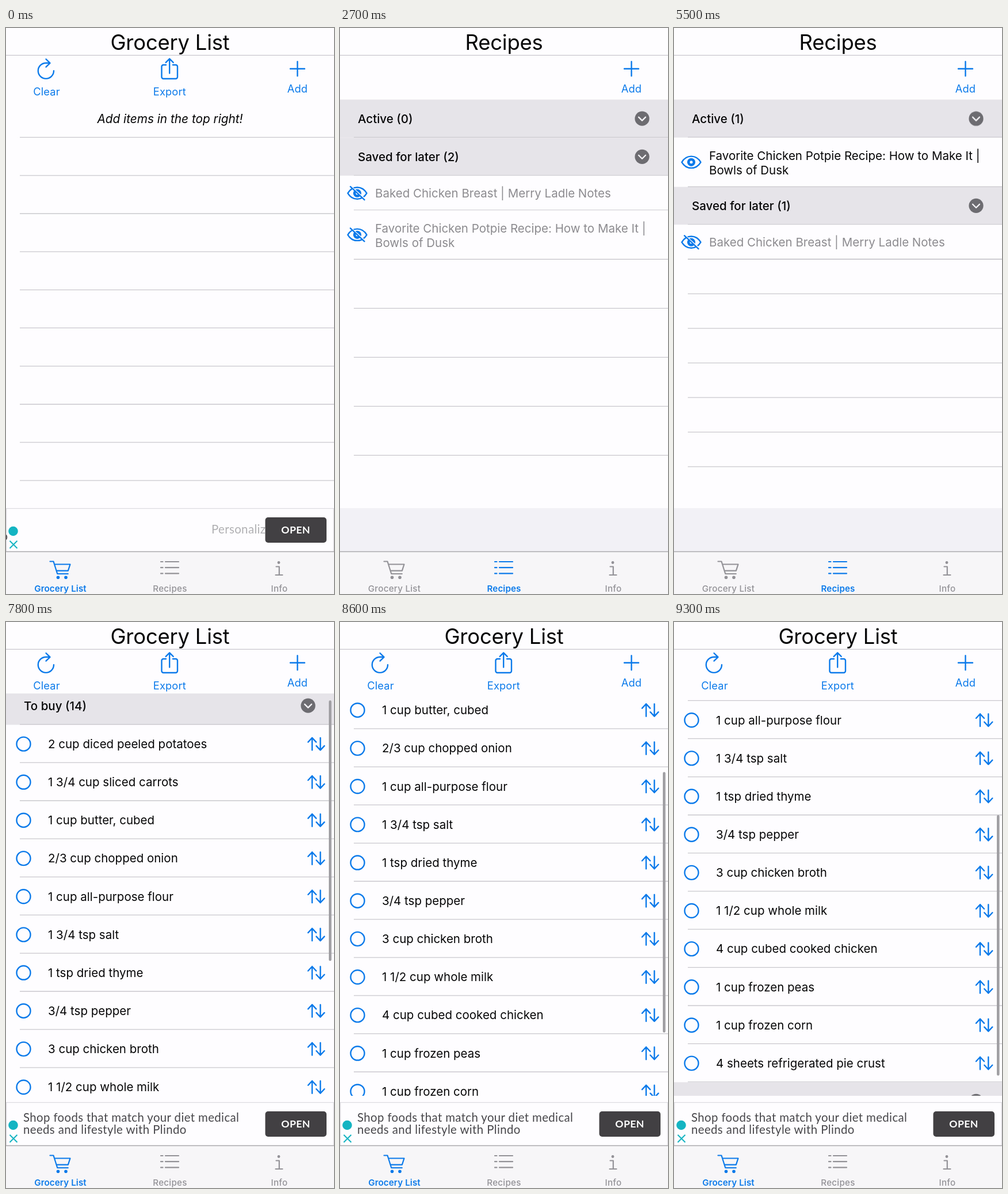
An HTML page for the animation above (9400 ms loop, 570 px wide and 982 px high).

```html
<!DOCTYPE html>
<html lang="en">
<head>
<meta charset="utf-8">
<title>Grocery list</title>
<style>
@property --s { syntax: '<number>'; inherits: true; initial-value: 0 }
@property --p { syntax: '<number>'; inherits: true; initial-value: 0 }

html, body { margin: 0; width: 100%; height: 100%; overflow: hidden; background: #fefdff }
svg { display: block; width: 100vw; height: 100vh }
text { font: 20.5px Inter, 'Liberation Sans', sans-serif; fill: #060607 }
.title { font-size: 36.4px; letter-spacing: -.2px; text-anchor: middle }
.label { font-size: 18.3px; letter-spacing: .1px; text-anchor: middle; fill: #0b7aea }
.hint { font-style: italic; font-size: 20.8px; text-anchor: middle }
.head { font-weight: 500 }
.later { fill: #8c8b8f }
.tab text { font-size: 15.2px; font-weight: 500; letter-spacing: .25px; text-anchor: middle; fill: #939297; stroke: none }
.tab.on text { fill: #0b7aea; font-weight: 600; letter-spacing: .1px }
.tab { stroke: #939297; color: #939297 }
.tab.on { stroke: #0b7aea; color: #0b7aea }
.ad text { font: 20.4px Lato, sans-serif; letter-spacing: .38px; fill: #47464a }
.ad .cta { font-size: 17.6px; font-weight: 700; letter-spacing: .4px; text-anchor: middle; fill: #fff }
.icon { fill: none; stroke: #0b7aea; stroke-width: 2.4; stroke-linecap: round; stroke-linejoin: round }
.line { stroke: #c9c8cd; stroke-width: 1.3 }

/* Visibility of the screens */
.home, .recipes, .empty, .full, .bar, .before, .after, .first, .second {
  animation: 9400ms step-end infinite;
}
.home { animation-name: home }
.recipes { animation-name: recipes }
.empty, .first { animation-name: early }
.full, .second { animation-name: late }
.bar { animation-name: bar }
.before { animation-name: before }
.after { animation-name: after }
@keyframes home { 0% { opacity: 1 } 14.89% { opacity: 0 } 69.145%, to { opacity: 1 } }
@keyframes recipes { 0% { opacity: 0 } 14.89% { opacity: 1 } 69.145%, to { opacity: 0 } }
@keyframes early { 0% { opacity: 1 } 14.89%, to { opacity: 0 } }
@keyframes late { 0% { opacity: 0 } 69.145%, to { opacity: 1 } }
@keyframes bar { 0% { opacity: 0 } 82.975%, to { opacity: 1 } }
@keyframes before { 0% { opacity: 1 } 44.675%, to { opacity: 0 } }
@keyframes after { 0% { opacity: 0 } 44.675%, to { opacity: 1 } }

/* List scrolling, one step every 100 ms */
.scroll { animation: scroll 9400ms step-end infinite }
.scroll .list { transform: translateY(calc(var(--s) * -1px)) }
.scroll .thumb { transform: translateY(calc(var(--s) * .65px)) }
@keyframes scroll {
  0% { --s: 0 }
  82.975% { --s: 12; animation-timing-function: steps(4) }
  87.23% { --s: 105; animation-timing-function: steps(4) }
  91.485% { --s: 203; animation-timing-function: steps(2) }
  93.613% { --s: 249; animation-timing-function: steps(2) }
  95.74% { --s: 285; animation-timing-function: steps(3) }
  98.932%, to { --s: 318 }
}

/* A recipe moves up into the active section */
.move { animation: move 9400ms step-end infinite }
.up { transform: translateY(calc(var(--p) * -126px)) }
.down { transform: translateY(calc(var(--p) * 85px)) }
.out { opacity: calc(1 - var(--p)) }
.in { opacity: var(--p) }
@keyframes move {
  0% { --p: 0 }
  44.675% { --p: .12 }
  45.74% { --p: .45 }
  46.805% { --p: .78 }
  47.87% { --p: .95 }
  48.932%, to { --p: 1 }
}

/* Banner texts slide in from the right */
.slide1 { animation: slide1 9400ms step-end infinite }
.slide2 { animation: slide2 9400ms step-end infinite }
.gone { animation: gone 9400ms step-end infinite }
@keyframes slide1 {
  0% { transform: translateX(327px); opacity: .42; animation-timing-function: steps(3) }
  3.187% { transform: translateX(150px); opacity: .7; animation-timing-function: steps(3) }
  6.378% { transform: translateX(45px); opacity: .9; animation-timing-function: steps(4) }
  10.634%, to { transform: translateX(0); opacity: 1 }
}
@keyframes slide2 {
  0% { transform: translateX(327px); opacity: .42 }
  69.145% { transform: translateX(327px); opacity: .42; animation-timing-function: steps(3) }
  72.336% { transform: translateX(110px); opacity: .8; animation-timing-function: steps(5) }
  77.655%, to { transform: translateX(0); opacity: 1 }
}
@keyframes gone { 0% { opacity: 1 } 1.06%, to { opacity: 0 } }
</style>
</head>
<body>
<script>
const ROW = 66.15, TOP = 157.2;
const items = [
  '2 cup diced peeled potatoes', '1 3/4 cup sliced carrots', '1 cup butter, cubed',
  '2/3 cup chopped onion', '1 cup all-purpose flour', '1 3/4 tsp salt', '1 tsp dried thyme',
  '3/4 tsp pepper', '3 cup chicken broth', '1 1/2 cup whole milk', '4 cup cubed cooked chicken',
  '1 cup frozen peas', '1 cup frozen corn', '4 sheets refrigerated pie crust'
];

const text = (x, y, s, cls = '') => `<text x="${x}" y="${y}" class="${cls}">${s}</text>`;
const rect = (x, y, w, h, fill, more = '') =>
  `<rect x="${x}" y="${y}" width="${w}" height="${h}" fill="${fill}" ${more}/>`;
const icon = d => `<path class="icon" d="${d}"/>`;
const group = (cls, s, more = '') => `<g class="${cls}" ${more}>${s}</g>`;
const at = (x, y, s) => `<g transform="translate(${x} ${y})">${s}</g>`;
const line = (y, x = 24) => `<path class="line" d="M${x} ${y}H570"/>`;
const lines = (y, step, n) => Array.from({ length: n }, (_, i) => line(y + i * step)).join('');

const header = label => rect(0, -33, 570, 66.2, '#e6e4e9') + label + line(32.5) +
  `<circle cx="525" r="12.6" fill="#6d6c71"/>
   <path d="M519-2.6l6 6 6-6" fill="none" stroke="#f4f3f6" stroke-width="2.3" stroke-linecap="round" stroke-linejoin="round"/>`;
const head = (s, cls = '') => text(31, 7.6, s, 'head ' + cls);

const eye = icon('M-16.5 0C-8.5-13.5 8.5-13.5 16.5 0C8.5 13.5-8.5 13.5-16.5 0z') +
  '<circle r="4.8" fill="none" stroke="#0b7aea" stroke-width="4.6"/>';
const hidden = eye + '<path d="M-13-13L14 11" stroke="#fefdff" stroke-width="3"/>' + icon('M-12-11.5L12.5 11.5');

const addButton = icon('M494 70.7h25M506.5 58.2v25') + text(506.5, 112.4, 'Add', 'label');
const topBar = title => text(285, 38, title, 'title') + line(47.3, 0);

const glyphs = [
  ['Grocery List', 94.5, `<path d="M76.5 925.5h6l6.8 21.5h18.5M84 930.5h27.5l-3.6 11.2H87.8" fill="none"/>
    <g fill="currentColor" stroke="none"><circle cx="90.5" cy="953.3" r="2.8"/><circle cx="104" cy="953.3" r="2.8"/></g>`],
  ['Recipes', 285, '<path d="M269 926h3.5M277 926h23M269 936.2h3.5M277 936.2h23M269 946.4h3.5M277 946.4h23"/>'],
  ['Info', 475, `<path d="M469.5 934.5h5.3v14M468.5 949h12" fill="none"/>
    <circle cx="474" cy="927.5" r="2.4" fill="currentColor" stroke="none"/>`]
];
const tabs = on => rect(0, 908, 570, 74, '#f7f6f8') + '<path d="M0 908.5H570" stroke="#aaa9ad" stroke-width="1.3"/>' +
  glyphs.map(([name, x, art], i) => group('tab' + (i === on ? ' on' : ''), art + text(x, 977.5, name),
    'stroke-width="2.2" stroke-linecap="round" stroke-linejoin="round"')).join('');

const itemRow = (name, i) => at(0, TOP + ROW * (i + 1),
  '<circle class="icon" cx="30.5" cy=".3" r="12"/>' + text(73, 7.6, name) +
  icon('M532 11V-10.5M525-3l7-7.5 7 7.5M546.3-10.5V11M539.3 3.5l7 7.5 7-7.5') + line(32.5));

const tools =
  icon('M83 74.3A13.6 13.6 0 1 1 69.4 60.7H76M69.5 54l7 6.8-7 6.8') + text(70.5, 117.3, 'Clear', 'label') +
  icon('M278 64h-4.5a3 3 0 0 0-3 3v18a3 3 0 0 0 3 3h21.5a3 3 0 0 0 3-3V67a3 3 0 0 0-3-3H290M284.2 78.5V54M277.7 59.8l6.5-6.5 6.5 6.5') +
  text(284.3, 117.3, 'Export', 'label') + addButton;

const list = at(0, TOP, header(head('To buy (14)'))) + items.map(itemRow).join('') +
  at(0, TOP + ROW * 15, header(head('Bought (0)')));

const ad = group('ad',
  '<rect x=".6" y="833.6" width="568.8" height="75" fill="#fefdff" stroke="#dddce0" stroke-width="1.3"/>' +
  group('', group('first', group('slide1', text(30, 877, 'Personalized food choices')) +
      group('gone', text(-8.5, 889, 'o'))) +
    group('second', group('slide2', text(30, 866.5, 'Shop foods that match your diet medical') +
      text(30, 887.8, 'needs and lifestyle with Plindo'))), 'clip-path="url(#copy)"') +
  rect(450.5, 849, 106.5, 44, '#424043', 'rx="5"') + text(503.5, 876.6, 'OPEN', 'cta') +
  `<circle cx="12.5" cy="873" r="8.3" fill="#14b4c2"/>
   <path d="M6.5 889.8l13 13m0-13l-13 13" stroke="#14b4c2" stroke-width="2"/>`);

const home = topBar('Grocery List') + tools +
  group('scroll',
    group('', group('empty', text(285, 164.8, 'Add items in the top right!', 'hint') + lines(189.7, ROW, 10)) +
      group('full', group('list', list)), 'clip-path="url(#view)"') +
    group('bar', group('thumb', rect(561, 128.3, 4.6, 452, '#a09fa3', 'rx="2.3"')))) +
  ad + tabs(0);

const potpie = cls => text(61, 38.4, 'Favorite Chicken Potpie Recipe: How to Make It |', cls) +
  text(61, 63.4, 'Bowls of Dusk', cls);

const recipes = topBar('Recipes') + addButton +
  group('move',
    group('out', lines(486.3, 85, 4)) + group('in', lines(461.2, 60, 6)) +
    at(0, TOP, header(head('Active (0)', 'before') + head('Active (1)', 'after'))) +
    group('down',
      at(0, TOP + ROW, header(head('Saved for later (2)', 'before') + head('Saved for later (1)', 'after'))) +
      at(0, 256.4, rect(0, 0, 570, 60, '#fefdff') + at(30, 30.3, hidden) +
        text(61, 37.8, 'Baked Chicken Breast | Merry Ladle Notes', 'later') + line(59.6))) +
    group('up', at(0, 316.3, rect(0, 0, 570, 85.2, '#fefdff') +
      group('before', at(30, 42.5, hidden) + potpie('later')) +
      group('after', at(30, 42.5, eye) + potpie('')) + line(85))) +
    line(401.4)) +
  rect(0, 833, 570, 76, '#f2f1f6') + tabs(1);

document.body.innerHTML = `<svg viewBox="0 0 570 982">
  <clipPath id="view"><rect y="124" width="570" height="697.5"/></clipPath>
  <clipPath id="copy"><rect y="834" width="452" height="74"/></clipPath>
  ${group('home', home)}${group('recipes', recipes)}</svg>`;
</script>
</body>
</html>
```
